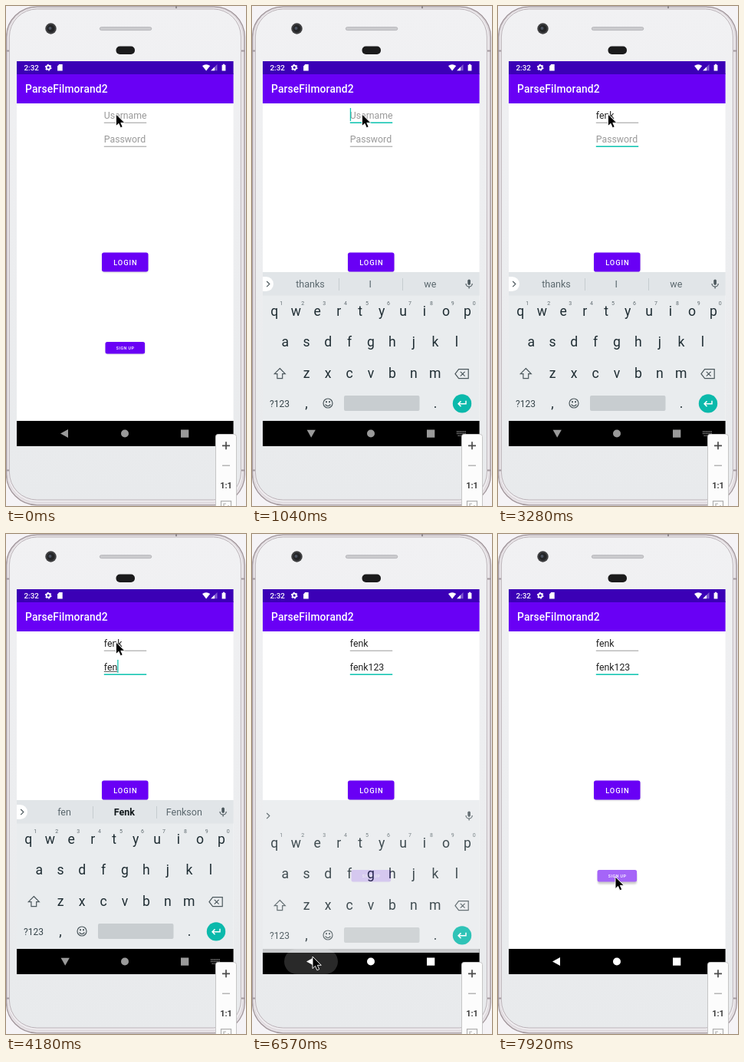
Recreate the animation shown at these times as an HTML page. Size 313 by 652 pixels, loop 8000 ms.

```html
<!DOCTYPE html>
<html lang="en">
<head>
<meta charset="utf-8">
<title>Login screen</title>
<style>
  html, body { margin: 0; width: 100%; height: 100%; overflow: hidden; background: #f5f3f6; }
  svg { display: block; width: 313px; height: 652px; font-family: Roboto, "Noto Sans", sans-serif; }
  text { white-space: pre; }
  .mid { text-anchor: middle; }
  .field { font-size: 12.3px; }
  .btn { fill: #fff; font-weight: 500; text-anchor: middle; }
  .key { font-size: 17.6px; fill: #1f2d33; text-anchor: middle; }
  .num { font-size: 7px; fill: #616c71; text-anchor: middle; }
  .word { font-size: 12.5px; fill: #5b686e; text-anchor: middle; }
  .line { fill: none; stroke: #4c585d; stroke-width: 1.2; }
</style>
</head>
<body>
<svg viewBox="0 0 313 652" xmlns="http://www.w3.org/2000/svg">
  <defs>
    <linearGradient id="body" x2="0" y2="1">
      <stop offset="0" stop-color="#f1f1f3"/>
      <stop offset="1" stop-color="#e8eaec"/>
    </linearGradient>
    <filter id="soft" x="-20%" y="-40%" width="140%" height="200%"><feGaussianBlur stdDeviation="1"/></filter>
    <clipPath id="screen"><rect x="14" y="72" width="282.6" height="502"/></clipPath>
  </defs>

  <!-- phone -->
  <rect x=".5" y=".8" width="310.8" height="650" rx="40" fill="#e6e1e5" stroke="#a0959a" stroke-width="1.3"/>
  <rect x="2.2" y="2.2" width="307" height="645" rx="38" fill="#efecef" stroke="#d5cfd3" stroke-width=".8"/>
  <rect x="4.4" y="4" width="302" height="640" rx="36" fill="url(#body)" stroke="#bbb3b8"/>
  <path d="M0 58.5h4M307 58.5h4.5M0 605.5h4M307 605.5h4.5" stroke="#a39a9f" stroke-width="2"/>
  <rect x="221" width="2" height="3" fill="#8f898c"/>
  <circle cx="58.5" cy="29.5" r="7.2" fill="#3f3f41"/>
  <circle cx="58.5" cy="29.5" r="5" fill="#242527"/>
  <circle cx="57.5" cy="29" r="2" fill="#4b5260"/>
  <rect x="122.3" y="27.6" width="67.5" height="4" rx="2" fill="#cbcbce" stroke="#b0b0b4" stroke-width=".8"/>
  <rect x="143.5" y="52.5" width="24.5" height="10.5" rx="5" fill="#1b1b1c"/>

  <g clip-path="url(#screen)">
    <rect x="14" y="72" width="283" height="502" fill="#fff"/>
    <rect x="14" y="88" width="283" height="39" fill="#6900f5"/>
    <rect x="14" y="72" width="283" height="17" fill="#3b00b6"/>
    <text x="23.5" y="84" font-size="9.8" font-weight="500" fill="#fff">2:32</text>
    <circle cx="55.2" cy="80.2" r="2.5" fill="none" stroke="#fff" stroke-width="1.8"/>
    <circle cx="55.2" cy="80.2" r="3.8" fill="none" stroke="#fff" stroke-width="1.2" stroke-dasharray="1.99"/>
    <path d="M69.3 76h4.4v8.4h-6.6v-6z" fill="#fff"/>
    <path d="M256 78q5-3.6 10.2 0l-5.1 6.4z" fill="#fff"/>
    <path d="M275.5 76v8.3h-8.3z" fill="#fff" fill-opacity=".35"/>
    <path d="M272 79.5v4.8h-4.8z" fill="#fff"/>
    <path d="M283 75.8h2v.9h1.4v7.7h-4.8v-7.7h1.4z" fill="#fff"/>
    <text x="25" y="113" font-size="13.8" font-weight="500" letter-spacing=".15" fill="#fff">ParseFilmorand2</text>

    <g id="fields"></g>

    <rect x="125.5" y="322.5" width="60" height="25" rx="2.7" fill="#000" opacity=".16" filter="url(#soft)"/>
    <rect x="125" y="321.5" width="60.5" height="25" rx="2.7" fill="#6900f5"/>
    <text class="btn" x="155.8" y="337.6" font-size="9.4" letter-spacing=".85">LOGIN</text>
    <rect id="signShade" x="130" y="439" width="51" height="15" rx="2.7" fill="#000" filter="url(#soft)"/>
    <rect id="sign" x="129.5" y="438" width="51.6" height="15.4" rx="2.5"/>
    <text class="btn" x="155.6" y="448" font-size="5.3" letter-spacing=".5">SIGN UP</text>

    <rect x="14" y="541" width="283" height="33" fill="#000"/>
    <g id="board">
      <rect id="panel" x="14" width="283" fill="#e9ecee"/>
      <rect id="strip" x="14" y="347" width="283" height="30.5" fill="#e1e5e8"/>
      <path id="tab" d="M14 353h4.5a9.5 9.5 0 0 1 0 19h-4.5z" fill="#fff"/>
      <path class="line" d="M19.2 359l3.6 3.6-3.6 3.6" stroke-width="1.5"/>
      <g id="words">
        <path d="M113.5 355v16M196.5 355v16" stroke="#c6cccf"/>
        <text class="word" x="76" y="367"></text>
        <text class="word" x="154.3" y="367"></text>
        <text class="word" x="232.3" y="367"></text>
      </g>
      <rect x="281.3" y="356.5" width="3.6" height="7.4" rx="1.8" fill="#4c585d"/>
      <path class="line" d="M279 362a4.1 4.1 0 0 0 8.2 0M283.1 366v2.6"/>
      <g id="keys"></g>
      <path class="line" d="M36.3 472.5l7 7.2h-3.6v6h-6.8v-6h-3.6z"/>
      <path class="line" d="M265 479.7l4.6-6h12.6v12h-12.6zM271.8 476.8l5.8 5.8M277.6 476.8l-5.8 5.8"/>
      <text class="mid" x="36" y="522.5" font-size="12" fill="#37454b">?123</text>
      <circle class="line" cx="99" cy="518" r="6"/>
      <path class="line" d="M95.6 519.5q3.4 4.2 6.8 0"/>
      <path d="M96 515.2h2v2h-2zM100 515.2h2v2h-2z" fill="#4c585d"/>
      <rect x="120" y="508" width="98.5" height="20" rx="2" fill="#c8cdd0"/>
      <circle cx="274" cy="518.4" r="12.2" fill="#0bb9ab"/>
      <path d="M279 514.8v4h-9.6M272.5 515.4l-3.4 3.4 3.4 3.4" fill="none" stroke="#fff" stroke-width="1.5"/>
    </g>

    <rect id="ripple" x="42" y="541" width="70" height="33" rx="16.5" fill="#fff"/>
    <g id="nav">
      <path id="back" d="M71 557.5l10-5.6v11.2z"/>
      <path id="down" d="M71.6 552.8h11.2l-5.6 10z"/>
      <circle cx="155" cy="557.5" r="5"/>
      <rect x="228" y="552.5" width="10.3" height="10.2"/>
      <path id="dots" d="M267 555h12M267 557.5h12M268.5 560.3h9" fill="none" stroke="#8c8c8c" stroke-width="1.3" stroke-dasharray="1.3 .8"/>
    </g>
  </g>

  <!-- side toolbar -->
  <rect x="273.5" y="558.5" width="27" height="110" rx="3" fill="#fcfcfc" stroke="#c6c6c6"/>
  <path d="M282 573.3h10M287 568.3v10" stroke="#4a4a4a" stroke-width="1.7"/>
  <path d="M282 599.3h10" stroke="#b4b4b4" stroke-width="1.5"/>
  <text class="mid" x="287" y="629" font-size="11" font-weight="700" fill="#3c3c3c">1:1</text>
  <path d="M280.5 652v-6.3h13v6.3M284 652v-3h3M290 652v-1" fill="none" stroke="#b0b0b0" stroke-width="1.2"/>

  <path id="mouse" d="M0 0v15.6l3.5-3.3 2.4 5.5 2.8-1.2-2.4-5.3h5z" fill="#000" stroke="#fff" stroke-width=".9"/>
</svg>

<script>
const LOOP = 8000, TEAL = '#16c5b3', LEFT = 127.8;
const $ = id => document.getElementById(id);

// Held values: [start ms, value...]
const TYPED = [
  [[0, ''], [1480, 'f'], [1930, 'fe'], [2080, 'fen'], [2530, 'fenk']],
  [[0, ''], [3730, 'f'], [3880, 'fe'], [4180, 'fen'], [4330, 'fenk'], [4480, 'fenk12'], [4770, 'fenk123']]
];
const COMPOSING = [[1480, 2830], [3730, 4770]];
const FOCUS = [[0, -1], [450, 0], [2830, 1]];
const CARET = [[0, 0], [600, 1], [1190, 0], [1480, 1], [3280, 0], [3730, 1], [5220, 0],
  [5670, 1], [5970, 0], [6870, 1], [7320, 0], [7620, 1], [7920, 0]];
const IDLE = ['thanks', 'I', 'we'], F = ['f', 'from', 'for'], FE = ['fe', 'few', 'feel'],
  FEN = ['fen', 'Fenk', 'Fenkson'], FENK = ['fenk', 'Fenk', 'Fenkson'];
const WORDS = [[0, IDLE], [1480, F], [1930, FE], [2080, FEN], [2530, FENK], [2830, IDLE],
  [3730, F], [3880, FE], [4180, FEN], [4330, FENK], [4480, ['', 'fenk12', '']], [4770, null]];
// opacity, downward shift
const BOARD = [[0, 0, 30], [890, .6, 14], [1040, 1, 0], [6570, .85, 5], [6720, .24, 30], [6870, 0, 30]];
const RIPPLE = [[0, 0], [6570, .16], [6720, .06], [6870, .04], [7020, 0]];
const SIGN = [[0, '#6900f5', .16], [7620, '#8330f6', .18], [7770, '#964ef7', .2], [7920, '#a565f8', .2]];
const MOUSE = [[0, 143.5, 141], [5070, 151, 153], [5220, 180, 198], [5370, 213, 248], [5520, 226, 271],
  [5670, 190, 352], [5820, 116, 470], [5970, 77, 531], [6120, 76.5, 552], [6570, 79, 551],
  [6720, 129.5, 526], [6870, 146, 497], [7020, 154, 470], [7170, 154, 455], [7320, 153, 449], [7470, 153, 447]];

const at = (table, t) => table.findLast(row => row[0] <= t).slice(1);

function add(parent, tag, attrs, text = '') {
  const el = document.createElementNS('http://www.w3.org/2000/svg', tag);
  set(el, attrs);
  el.textContent = text;
  return parent.appendChild(el);
}
function set(el, attrs) {
  for (const k in attrs) el.setAttribute(k, attrs[k]);
}

function keyRow(chars, x, y) {
  [...chars].forEach((c, i) => add($('keys'), 'text', { class: 'key', x: x + i * 27.95, y }, c));
}
keyRow('qwertyuiop', 29.3, 404);
keyRow('asdfghjkl', 43.2, 444);
keyRow('zxcvbnm', 71.1, 485);
keyRow(',', 71.1, 524);
keyRow('.', 239, 524);
[...'1234567890'].forEach((c, i) =>
  add($('keys'), 'text', { class: 'num', x: 38.2 + i * 27.95, y: 389.8 }, c));

const fields = ['Username', 'Password'].map((hint, i) => {
  const g = $('fields'), y = 147 + i * 31;
  return {
    hint, y,
    text: add(g, 'text', { class: 'field', x: LEFT, y }),
    mark: add(g, 'rect', { x: LEFT, y: y + 1.2, height: .8, fill: '#333' }),
    rule: add(g, 'rect', { x: 127.8, width: 55.4 }),
    caret: add(g, 'rect', { y: y - 14, width: 1.3, height: 17, fill: TEAL })
  };
});
const words = [...$('words').querySelectorAll('text')];

function drawField(f, i, t) {
  const [typed] = at(TYPED[i], t), on = at(FOCUS, t)[0] === i;
  const [from, to] = COMPOSING[i];
  f.text.textContent = typed || f.hint;
  set(f.text, { fill: typed ? '#212121' : '#999' });
  const w = typed ? f.text.getComputedTextLength() : 0;
  set(f.mark, { width: t >= from && t < to ? w : 0 });
  set(f.rule, on ? { y: f.y + 4.4, height: 1.6, fill: TEAL } : { y: f.y + 4.7, height: 1, fill: '#9b9b9b' });
  set(f.caret, { x: LEFT + w, opacity: on ? at(CARET, t)[0] : 0 });
}

function draw(t) {
  fields.forEach((f, i) => drawField(f, i, t));

  const [alpha, shift] = at(BOARD, t);
  set($('board'), { opacity: alpha, transform: `translate(0 ${shift})` });
  set($('panel'), { y: 347 - shift, height: 194 + shift });
  set($('strip'), { opacity: shift ? 0 : 1 });
  set($('tab'), { opacity: shift ? 0 : 1 });
  const list = at(WORDS, t)[0];
  const full = list && list[0];
  set($('words').firstElementChild, { opacity: full ? 1 : 0 });
  words.forEach((el, i) => {
    el.textContent = list ? list[i] : '';
    const bold = i === 1 && list && list !== IDLE;
    el.style.fontWeight = bold ? 700 : 400;
    el.style.fill = bold ? '#11181b' : '';
  });

  const open = t >= 890 && t < 6570;
  set($('nav'), { fill: t >= 6570 ? '#fff' : '#9a9a9a' });
  set($('back'), { opacity: open ? 0 : 1 });
  set($('down'), { opacity: open ? 1 : 0 });
  set($('dots'), { opacity: open ? 1 : 0 });
  set($('ripple'), { opacity: at(RIPPLE, t)[0] });

  const [fill, shade] = at(SIGN, t);
  set($('sign'), { fill });
  set($('signShade'), { opacity: shade, y: t >= 7620 ? 441.5 : 439 });
  set($('mouse'), { transform: `translate(${at(MOUSE, t).join(' ')})` });
}

const start = performance.now();
function tick() {
  draw((performance.now() - start) % LOOP);
  requestAnimationFrame(tick);
}
tick();
</script>
</body>
</html>
```
